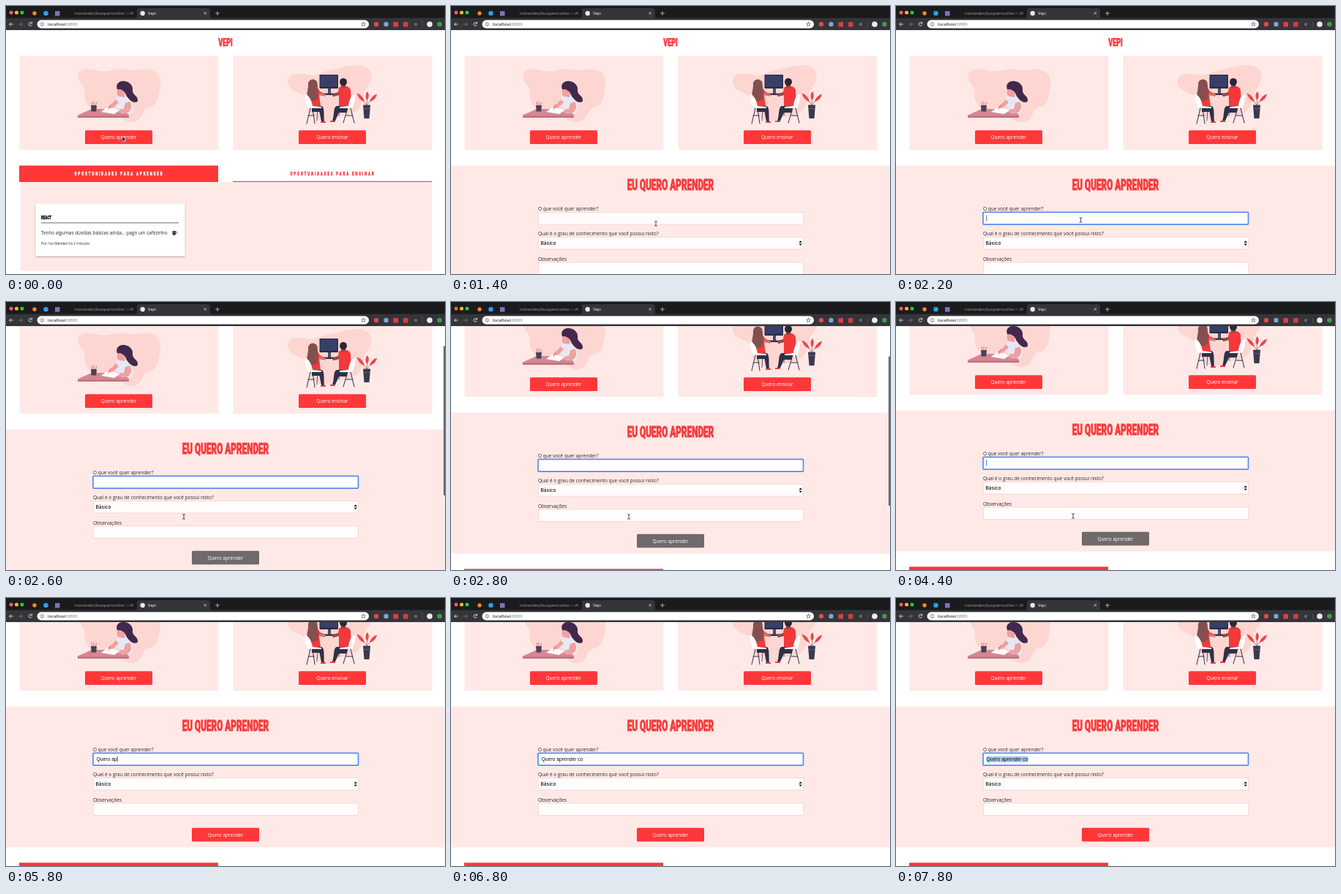
An HTML page that plays this animation: 600 by 367 pixels, repeating every 8 s.

```html
<!DOCTYPE html>
<html lang="pt-BR">
<head>
<meta charset="utf-8">
<title>Vepi</title>
<style>
  html, body { margin: 0; width: 100%; height: 100%; overflow: hidden; background: #fff; }
  svg { display: block; width: 100vw; height: 100vh; }
  text { font: 400 6.5px "Open Sans", sans-serif; fill: #2b2727; white-space: pre; }
  .mid { text-anchor: middle; }
  .btn { fill: #fff; }
  .head { font-family: Roboto, sans-serif; font-weight: 900; stroke-width: .045em; stroke-linejoin: round; }
  .ui { font: 400 5.5px Roboto, sans-serif; }
  .input { font: 400 6.8px "Liberation Sans", Arial, sans-serif; fill: #111; }
  .box { fill: #fffcfc; stroke: #f3cfca; stroke-width: .7; }
  .line { fill: none; stroke-linecap: round; stroke-linejoin: round; }
</style>
</head>
<body>
<svg viewBox="0 0 600 367" preserveAspectRatio="none">
  <defs>
    <filter id="soft" x="-10%" y="-10%" width="120%" height="130%">
      <feDropShadow dx="0" dy="1.2" stdDeviation="1.2" flood-color="#522" flood-opacity=".4"/>
    </filter>
  </defs>
  <rect width="600" height="367" fill="#fff"/>

  <g id="page">
    <g id="logo"></g>
    <path d="M18.500 68H290.500V197H18.500ZM310.500 68H582.500V197H310.500Z" fill="#fee9e7"/>

    <!-- learner at a desk -->
    <g>
      <path d="M99 93C101 84 116 86 128 89C141 92 148 84 164 87C181 90 188 84 200 88C213 93 212 105 210 116C208 128 206 137 195 139C186 141 188 153 178 158C167 162 160 155 152 150C140 144 122 146 113 137C104 127 111 118 105 110C101 104 97 100 99 93Z" fill="#fdd6d2"/>
      <path d="M98 149.500L117 141H162L168 150V153H98Z" fill="#d58793"/>
      <path d="M98 150.500H168V153H98Z" fill="#c4707f"/>
      <path d="M152 124C158 121 167 123 170 129C174 136 173 141 171 147H158L151 137L146 139Z" fill="#e6e9f4"/>
      <path d="M169 131C173 137 171 145 164 147L146 145V142L161 141L163 133Z" fill="#efa0a0"/>
      <path d="M150 128L143 136L137 140L140 142L148 138L154 132Z" fill="#efa0a0"/>
      <path d="M153 113C151 118 151 124 156 124L162 125L163 114Z" fill="#efa0a0"/>
      <path d="M152 114C149 106 156 102 162 103C170 104 174 110 173 116C173 122 181 123 180 130C178 134 170 131 167 126C163 122 164 117 158 115C156 113 154 115 152 114Z" fill="#41284c"/>
      <path d="M130 145L138 139L156 142L148 148Z" fill="#fff"/>
      <path d="M140 142L143 135" class="line" stroke="#f33" stroke-width=".7"/>
      <path d="M118 136L117 131.500M120 136V131M122 136L124 132" class="line" stroke="#d9565d" stroke-width=".8"/>
      <path d="M116 136H124L123.300 144.500H116.700Z" fill="#4b4259"/>
    </g>

    <!-- pair at a computer -->
    <g>
      <path d="M385 103C386 91 399 92 412 94C424 97 433 89 446 87C462 84 479 77 491 83C503 89 501 103 494 111C486 120 490 132 481 142C472 151 458 149 448 155C434 162 423 154 417 148C408 139 415 129 404 121C396 117 384 114 385 103Z" fill="#fdd6d2"/>
      <rect x="428.500" y="94" width="25.500" height="19" rx=".8" fill="#2d2f4c"/>
      <path d="M430 95.500H452.500V110.500H430Z" fill="#38406a"/>
      <path d="M440 113H444V120H440Z" fill="#4b4d66"/>
      <path d="M418 119.500H468V122H418Z" fill="#343650"/>
      <path d="M427 122L425 157M457 122L455 150" class="line" stroke="#343650" stroke-width=".8"/>
      <path d="M418 137H431C436 138 434 150 435 158H431L428.500 145H418ZM466 137H452C447 138 449 151 446 157H450L455 146H466Z" fill="#302f48"/>
      <path d="M430 158H437V160H430ZM443 157H450V159H443Z" fill="#ec3e42"/>
      <path d="M413 113C419 109 427 111 429 117L437 121L436 123.500L428 122L430 137H413Z" fill="#f5383b"/>
      <path d="M428 118.500L437 121L436 123.500L428 122Z" fill="#c77c70"/>
      <path d="M413 108C412 99 424 98 425.500 105C426 112 428 120 426 127C423 131 414 131 412 127C410 121 413 115 413 108Z" fill="#84504f"/>
      <path d="M455 112C460 108 469 109 471 115L472 137H455V122L447 124L446 121L454 118Z" fill="#f5383b"/>
      <path d="M454 118L446 121L447 124L455 122Z" fill="#8c4c46"/>
      <path d="M458 107H464V112H458Z" fill="#8c4c46"/>
      <ellipse cx="461" cy="104" rx="5" ry="5.300" fill="#2e2635"/>
      <path d="M408 121C412 120 417 126 419 137L431 138V140H413C410 135 409 129 408 121ZM477.500 121C473 120 469 127 468 137L456 138V140H473C476 135 477 128 477.500 121Z" fill="#fff"/>
      <path d="M416 140L411 161M419 140L422 161M413 150H421M467 140L461 160M471 140L476 160M465 150H474" class="line" stroke="#302f48" stroke-width="1"/>
      <path d="M493 136L485 124M493 136L494 124M493 136L501 126" class="line" stroke="#8c3f4b" stroke-width=".6"/>
      <path d="M490 131C485 130 481 125 479.500 119.500C485 121 489 126 490 131ZM493.500 129C490.500 125 491 120 494 117C496.500 121 496.500 125 493.500 129ZM497 131C498 126 502 122 507 120.500C506 126 502 130 497 131Z" fill="#ef4648"/>
      <path d="M488 135.500H498L496.500 154H489.500Z" fill="#3b3a4e"/>
      <path d="M489 140.500H497" class="line" stroke="#6a6a80" stroke-width=".8"/>
    </g>

    <g fill="#ff3739">
      <rect x="108" y="170.200" width="92" height="18.800" rx="1.500"/>
      <rect x="400" y="170.200" width="92" height="18.800" rx="1.500"/>
    </g>
    <text class="btn mid" x="154" y="182.200">Quero aprender</text>
    <text class="btn mid" x="446" y="182.200">Quero ensinar</text>

    <g id="form">
      <rect y="218.500" width="600" height="193" fill="#fee9e7"/>
      <g id="formHead"></g>
      <text x="119" y="280">O que você quer aprender?</text>
      <text x="119" y="314.300">Qual é o grau de conhecimento que você possui nisto?</text>
      <text x="119" y="348.800">Observações</text>
      <rect class="box" x="119.500" y="282.500" width="362" height="16.500"/>
      <rect class="box" x="119.500" y="316.500" width="362" height="16.500" rx="1.500"/>
      <rect class="box" x="119.500" y="351" width="362" height="16.500"/>
      <text x="122.500" y="327.300" style="font:500 6.6px Inter,sans-serif;fill:#111">Básico</text>
      <path d="M475.500 324L477.700 321.200L479.900 324ZM475.500 325.500L477.700 328.300L479.900 325.500Z" fill="#222"/>
      <rect id="ring" x="119" y="282.300" width="362.500" height="16.800" rx="1" fill="#fff" stroke="#5a8cf0" stroke-width="1.700"/>
      <rect id="sel" x="123.500" y="286.500" height="8.500" fill="#abcdf5"/>
      <text id="typed" class="input" x="123.500" y="293"></text>
      <rect id="caret" y="286.500" width=".7" height="8" fill="#222"/>
      <rect id="submit" x="254" y="384.700" width="92" height="18.800" rx="1.500"/>
      <text class="btn mid" x="300" y="396.700">Quero aprender</text>
    </g>

    <g id="list">
      <rect x="20" y="241" width="562" height="122" fill="#fee9e7"/>
      <rect x="18" y="218.500" width="272" height="22.500" fill="#ff3739"/>
      <rect x="310" y="239.800" width="272" height="1.200" fill="#f0484a"/>
      <rect x="40.500" y="270.500" width="204" height="72" rx="1" fill="#fff" filter="url(#soft)"/>
      <g id="listHeads"></g>
      <rect x="48" y="296.500" width="188" height=".9" fill="#5a505a"/>
      <text x="48" y="312.500" style="font-size:6.3px">Tenho algumas dúvidas básicas ainda... pago um cafézinho</text>
      <path d="M227.500 308H232V312.500L230.500 314H229L227.500 312.500Z" fill="#5a3a3c"/>
      <path d="M232 309C234.500 308.500 234.500 312 232 312" class="line" stroke="#5a3a3c" stroke-width=".8"/>
      <text x="48" y="327.200" style="font-size:4.8px">Por: Ivo Mendes há 2 minutos</text>
    </g>
  </g>

  <rect id="bar" x="598" width="2" height="205" rx="1" fill="#6b6868"/>

  <g>
    <rect width="600" height="17" fill="#1b1b1e"/>
    <rect y="16.500" width="600" height="16.500" fill="#343539"/>
    <path d="M176 17C179 17 179 15 179 13V6Q179 3 182 3H276Q279 3 279 6V13C279 15 279 17 282 17Z" fill="#343539"/>
    <circle cx="7" cy="9" r="2.500" fill="#f95e57"/>
    <circle cx="14.500" cy="9" r="2.500" fill="#fbbc2f"/>
    <circle cx="22" cy="9" r="2.500" fill="#2ac840"/>
    <circle cx="39" cy="10" r="2.700" fill="#f28a2b"/>
    <circle cx="54.500" cy="10" r="3.300" fill="#2b9fe8"/>
    <rect x="67" y="7" width="6.500" height="6.500" fill="#7e70c4"/>
    <text class="ui" x="94" y="12" style="fill:#8f9094">ivomendes/busquemconhecim</text>
    <rect x="161" y="6" width="8" height="8" fill="#1b1b1e" opacity=".6"/>
    <circle cx="186.700" cy="10" r="3.200" fill="#e8e8ea"/>
    <text class="ui" x="194" y="12" style="fill:#eee">Vepi</text>
    <path d="M170.500 8.300L173.700 11.500M173.700 8.300L170.500 11.500" class="line" stroke="#999" stroke-width=".7"/>
    <path d="M270.700 8.300L273.900 11.500M273.900 8.300L270.700 11.500M286.500 10H291.500M289 7.500V12.500" class="line" stroke="#ccc" stroke-width=".8"/>
    <rect x="42.500" y="19.300" width="453.500" height="11.200" rx="5.600" fill="#fff"/>
    <path d="M9.500 25H4.800M6.800 22.800L4.600 25L6.800 27.200" class="line" stroke="#ddd" stroke-width=".9"/>
    <path d="M17.500 25H22.200M20.200 22.800L22.400 25L20.200 27.200" class="line" stroke="#77787c" stroke-width=".9"/>
    <path d="M35.300 23.400A2.400 2.400 0 1 0 35.500 26M35.600 22V23.900H33.700" class="line" stroke="#ddd" stroke-width=".9"/>
    <circle cx="49.500" cy="25" r="2.400" fill="none" stroke="#666" stroke-width=".7"/>
    <path d="M49.500 25V26.300M49.500 23.600V23.700" class="line" stroke="#666" stroke-width=".7"/>
    <text class="ui" x="57" y="27.200" style="font-size:6.200px;fill:#222">localhost<tspan fill="#85868a">:8889</tspan></text>
    <path d="M488.500 22L489.300 24L491.400 24.200L489.800 25.500L490.300 27.500L488.500 26.400L486.700 27.500L487.200 25.500L485.600 24.200L487.700 24Z" class="line" stroke="#555" stroke-width=".7"/>
    <circle cx="506" cy="25" r="3.300" fill="#e2454b"/>
    <circle cx="519.500" cy="25" r="3.200" fill="#7fa5d6"/>
    <rect x="529.500" y="22" width="6.500" height="6.500" fill="#e13c43"/>
    <rect x="543" y="22" width="6.500" height="6.500" fill="#d93b3b"/>
    <circle cx="560" cy="25" r="2.200" fill="#65666b"/>
    <path d="M569.500 21V29" stroke="#55565a" stroke-width=".7"/>
    <circle cx="579" cy="25" r="3.800" fill="#eee"/>
    <circle cx="592.500" cy="25" r="3.300" fill="#3f9d4d"/>
  </g>

  <path id="arrow" d="M0 0V7L1.700 5.600L2.800 8L4 7.400L2.900 5.100H5Z" fill="#111" stroke="#fff" stroke-width=".6"/>
  <path id="beam" d="M-1.500 -3.300Q0 -3.300 0 -2.300Q0 -3.300 1.500 -3.300M0 -2.300V2.300M-1.500 3.300Q0 3.300 0 2.300Q0 3.300 1.500 3.300" class="line" stroke="#222" stroke-width=".8"/>
</svg>
<script>
const $ = id => document.getElementById(id);
const LOOP = 8000, STEP = 200, FORM_H = 214;
const OPEN = 600, FOCUS = 2000, TYPE = 4950, SELECT = 7400;
const PHRASE = 'Quero aprender co';
const RED = '#f93a3c';

// Narrow poster lettering shared by all headings
const heading = (x, y, size, text, color, anchor = 'middle', gap = 0) =>
  `<text class="head" transform="translate(${x} ${y}) scale(.6 1)" text-anchor="${anchor}"
    style="font-size:${size}px;letter-spacing:${gap}px;fill:${color};stroke:${color}">${text}</text>`;

$('logo').innerHTML = heading(300, 54.8, 14.8, 'VEPI', RED);
$('formHead').innerHTML = heading(300, 252, 19.6, 'EU QUERO APRENDER', RED);
$('listHeads').innerHTML =
  heading(154.5, 232, 7.5, 'OPORTUNIDADES PARA APRENDER', '#fff', 'middle', 3) +
  heading(446.5, 232, 7.5, 'OPORTUNIDADES PARA ENSINAR', RED, 'middle', 3) +
  heading(48, 292, 7.5, 'REACT', '#111', 'start');

// Linear interpolation through [time, value] points
function track(points, t) {
  let [t0, v0] = points[0];
  for (const [t1, v1] of points) {
    if (t < t1) return v0 + (v1 - v0) * (t - t0) / (t1 - t0);
    [t0, v0] = [t1, v1];
  }
  return v0;
}
const scrollY = [[0, 0], [2200, 0], [2400, 20], [2600, 44], [2800, 67], [3000, 70]];
const mouseX = [[0, 159], [600, 159], [1200, 280], [1400, 280], [2000, 262], [2400, 243], [2800, 243], [4400, 242]];
const mouseY = [[0, 178.5], [600, 178.5], [1200, 298], [1400, 298], [2000, 292], [2400, 294], [2800, 294], [4400, 293]];

const show = (id, on) => $(id).setAttribute('display', on ? 'inline' : 'none');
const move = (id, x, y) => $(id).setAttribute('transform', `translate(${x} ${y})`);

function render(t) {
  const open = t >= OPEN;
  const scroll = track(scrollY, t);
  const count = Math.max(0, Math.min(PHRASE.length, Math.floor((t - TYPE) / 105)));
  const typing = count > 0 && count < PHRASE.length;
  const selected = t >= SELECT;

  move('page', 0, -scroll);
  show('form', open);
  move('list', 0, open ? FORM_H : 0);
  show('bar', t >= 2300 && t < 3400);
  $('bar').setAttribute('y', 33 + scroll * 334 / 544);

  show('ring', t >= FOCUS);
  show('sel', selected);
  $('typed').textContent = PHRASE.slice(0, count);
  const width = count ? $('typed').getComputedTextLength() : 0;
  $('sel').setAttribute('width', width);
  $('caret').setAttribute('x', 123.5 + width);
  show('caret', t >= FOCUS && !selected && (typing || (t - FOCUS) % 1000 < 500));
  $('submit').setAttribute('fill', count ? '#ff3739' : '#706a6b');

  const x = track(mouseX, t), y = track(mouseY, t);
  const arrow = t < 1200;
  show('arrow', arrow);
  show('beam', !arrow && count === 0);
  move('arrow', x, y);
  move('beam', x, y);
}

const start = performance.now();
function tick() {
  const t = (performance.now() - start) % LOOP;
  render(Math.floor(t / STEP) * STEP);
  requestAnimationFrame(tick);
}
tick();
</script>
</body>
</html>
```
